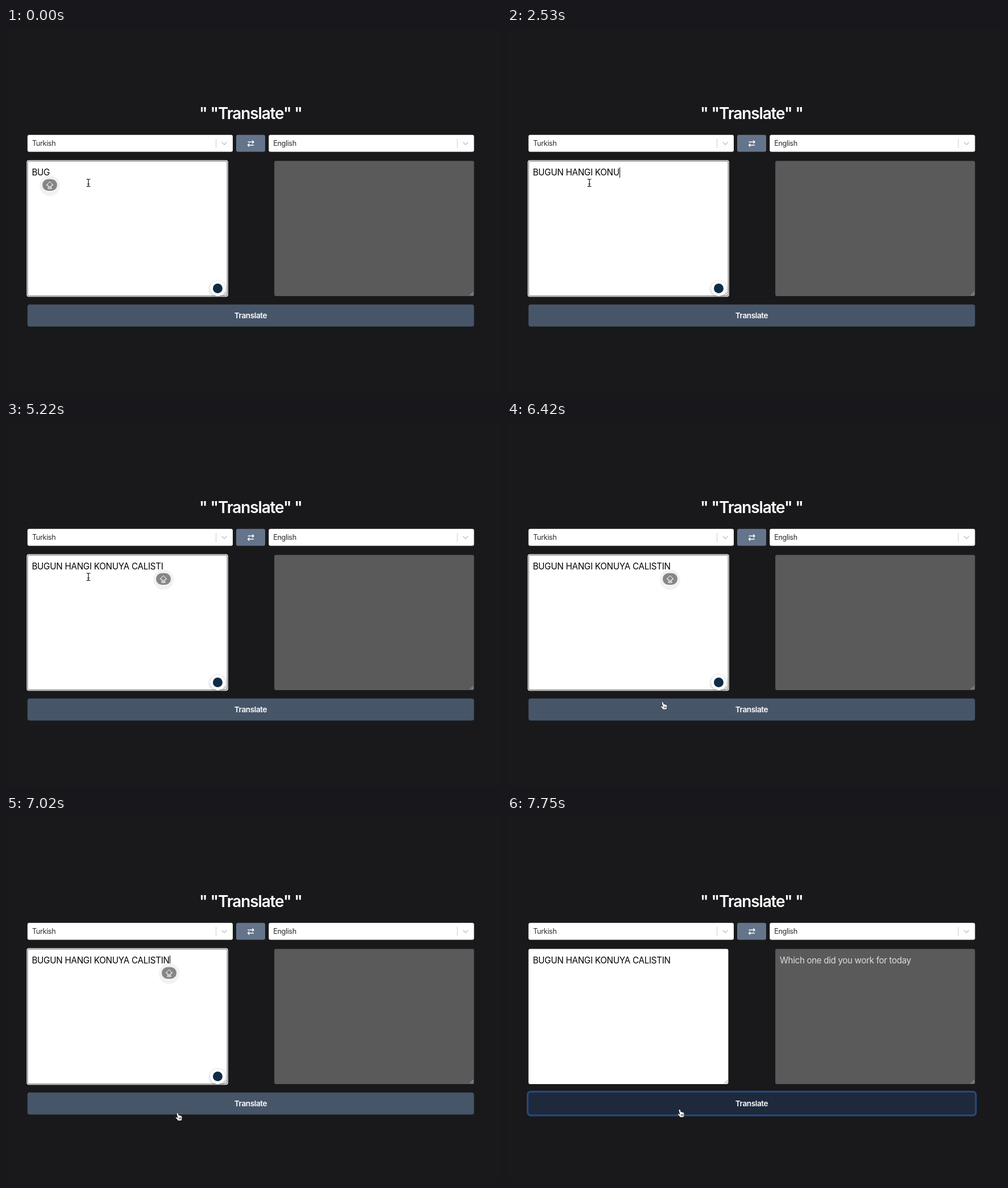
An HTML page for the animation above (8000 ms loop, 871 px wide and 643 px high).

```html
<!DOCTYPE html>
<html lang="en">
<head>
<meta charset="utf-8">
<title>Translate</title>
<style>
  html, body { margin: 0; width: 871px; height: 643px; overflow: hidden; background: #19191b; }
  body { position: relative; font-family: Inter, Roboto, sans-serif; font-optical-sizing: none; }
  body > * { position: absolute; white-space: pre; }
  svg { left: 0; top: 0; }
  h1 { left: 340px; top: 130px; margin: 0; font-size: 28px; font-weight: 600; line-height: 41px;
       letter-spacing: -1.15px; color: #fff; }
  .choice { top: 188px; color: #2b2b2b; font-size: 12.7px; line-height: 30px; letter-spacing: -.38px; }
  .line { top: 243.5px; font-size: 15.2px; line-height: 20px; }
  #typed { left: 45.4px; height: 20px; color: #000; letter-spacing: -.26px; }
  #typed.caret::after { content: ""; position: absolute; left: 100%; top: 1px; width: 1px; height: 18px; background: #000; }
  #result { left: 480px; color: #dcdcdd; letter-spacing: -.35px; }
  .label { left: 38px; top: 486px; width: 785px; color: #fff; font-size: 13.6px; font-weight: 600;
           line-height: 39px; letter-spacing: -.4px; text-align: center; }
  #button { fill: #475569; }
  #button.pressed { fill: #1e293b; stroke: #284a87; stroke-width: 6px; paint-order: stroke; }
  #helper { left: 359px; top: 444px; width: 27px; height: 27px; border-radius: 50%; background: #fff;
            box-shadow: 0 1px 4px rgba(0,0,0,.3); }
  #helper::after { content: ""; position: absolute; inset: 5px; border-radius: 50%; background: #0f2b46; }
</style>
</head>
<body>
<svg width="871" height="643" fill="none">
  <defs>
    <g id="select">
      <rect width="361.2" height="29.7" rx="3" fill="#fff"/>
      <path d="M331.8 7V23" stroke="#ccc"/>
      <path d="M342.3 13.2l4 4l4-4" stroke="#c4c4c4" stroke-width="1.5" stroke-linecap="round"/>
    </g>
    <path id="grip" d="M-6 0L0-6M-2.5 0L0-2.5"/>
  </defs>
  <use href="#select" x="37.8" y="187.8"/>
  <use href="#select" x="462.3" y="187.8"/>
  <rect x="405" y="187.8" width="51" height="29.7" rx="3" fill="#64748b"/>
  <path d="M425.5 200.3H436M433.3 197.6L436 200.3L433.3 203M436 205.7H425.5M428.2 203L425.5 205.7L428.2 208.4"
        stroke="#fff" stroke-width="1.4"/>
  <rect x="37.8" y="233.6" width="351.6" height="237.4" rx="3" fill="#fff"/>
  <g id="focus">
    <rect x="36.4" y="232.3" width="354.4" height="240" rx="4" fill="#fff"/>
    <rect x="38" y="233.9" width="351.2" height="236.8" rx="2.5" stroke="#333" stroke-width=".8"/>
  </g>
  <rect x="472.1" y="233.6" width="351.4" height="237.4" rx="3" fill="#5a5a5b"/>
  <use href="#grip" x="388.5" y="470" stroke="#666" stroke-width=".8"/>
  <use href="#grip" x="822.5" y="470" stroke="#ddd" stroke-width=".8"/>
  <rect id="button" x="37.8" y="485.8" width="785.7" height="38.7" rx="4"/>
</svg>
<h1>" "Translate" "</h1>
<div class="choice" style="left:46px">Turkish</div>
<div class="choice" style="left:470.2px">English</div>
<div class="line" id="typed"></div>
<div class="line" id="result">Which one did you work for today</div>
<div class="label">Translate</div>
<div id="helper"></div>
<svg width="871" height="643" fill="none">
  <defs>
    <path id="stem" d="M-3-6.5Q0-6.5 0-5Q0-6.5 3-6.5M0-5V5M-3 6.5Q0 6.5 0 5Q0 6.5 3 6.5M-1.5 2H1.5"/>
  </defs>
  <g id="badge">
    <circle cy="1" r="18" fill="#f2f2f2"/>
    <rect x="-13" y="-10.5" width="26" height="20.5" rx="10.2" fill="#868686"/>
    <path d="M0-6L6 0H3V2.6H-3V0H-6ZM-3 4.4H3V6.2H-3Z" stroke="#fff" stroke-linejoin="round"/>
  </g>
  <g id="beam" stroke-linecap="round">
    <use href="#stem" stroke="#fff" stroke-width="2.4"/>
    <use href="#stem" stroke="#111" stroke-width="1.2"/>
  </g>
  <g id="hand" stroke="#111" stroke-width=".8" stroke-linejoin="round">
    <path d="M-3.4-6.2Q-2-7.6-1-5.8L.2-2Q1.6-3 2.3-1.6Q3.6-2.4 4.3-1Q5.6-1.4 5.9 0L6 3.2L5 7L-1 7.4L-5.4 2.4Q-6.2 .8-4.4 .8L-2.2 2.2L-3.8-4.6Q-4-5.6-3.4-6.2Z" fill="#fff"/>
    <path d="M.3 1.8L.8 5M2.2 1.6L2.5 4.8M4 1.4L4.1 4.4"/>
  </g>
  <path id="arrow" d="M0 0V14L3.2 11L5.3 16L7.6 15L5.5 10.2H10Z" fill="#000" stroke="#fff"/>
</svg>
<script>
  const LOOP = 8000;
  const TEXT = "BUGUN HANGI KONUYA CALISTIN";
  const $ = id => document.getElementById(id);

  // Each track lists [start time, value...]; a value holds until the next start.
  const tracks = {
    length: [[0, 3], [290, 4], [590, 5], [740, 6], [890, 7], [1040, 8], [1190, 9], [1340, 10], [1490, 11],
      [1790, 12], [1940, 13], [2230, 14], [2380, 15], [2530, 16], [2830, 17], [2980, 19],
      [3280, 20], [3420, 21], [3720, 22], [4020, 23], [4170, 24], [4320, 25], [4620, 26], [5670, 27]],
    caret: [[0, 0], [290, 1], [5220, 0], [5670, 1], [6120, 0], [6720, 1], [7160, 0]],
    badge: [[0, 77], [290, 0], [5220, 277], [5670, 0], [6120, 287], [7310, 0]],
    pointer: [[0, "beam", 145, 272], [6270, "beam", 214, 405], [6420, "hand", 276, 498],
      [6570, "hand", 291, 520], [6720, "arrow", 300, 531], [6870, "arrow", 302, 528],
      [7020, "hand", 304, 528], [7160, "hand", 306, 522]],
    pressed: [[0, 0], [7160, 1]],
    focus: [[0, 1], [7310, 0]],
    helper: [[0, 1], [7460, 0]],
    result: [[0, 0], [7750, 1]]
  };

  const at = (name, t) => tracks[name].findLast(step => step[0] <= t).slice(1);
  const show = (id, on) => { $(id).style.visibility = on ? "visible" : "hidden"; };
  const move = (id, x, y) => $(id).setAttribute("transform", `translate(${x} ${y})`);

  function draw(t) {
    const get = name => at(name, t)[0];
    $("typed").textContent = TEXT.slice(0, get("length"));
    $("typed").classList.toggle("caret", !!get("caret"));
    $("button").classList.toggle("pressed", !!get("pressed"));
    for (const id of ["focus", "helper", "result", "badge"]) show(id, get(id));
    move("badge", get("badge"), 276);
    const [kind, x, y] = at("pointer", t);
    for (const id of ["beam", "hand", "arrow"]) show(id, id === kind);
    move(kind, x, y);
  }

  const start = performance.now();
  function tick() {
    draw((performance.now() - start) % LOOP);
    requestAnimationFrame(tick);
  }
  tick();
</script>
</body>
</html>
```
